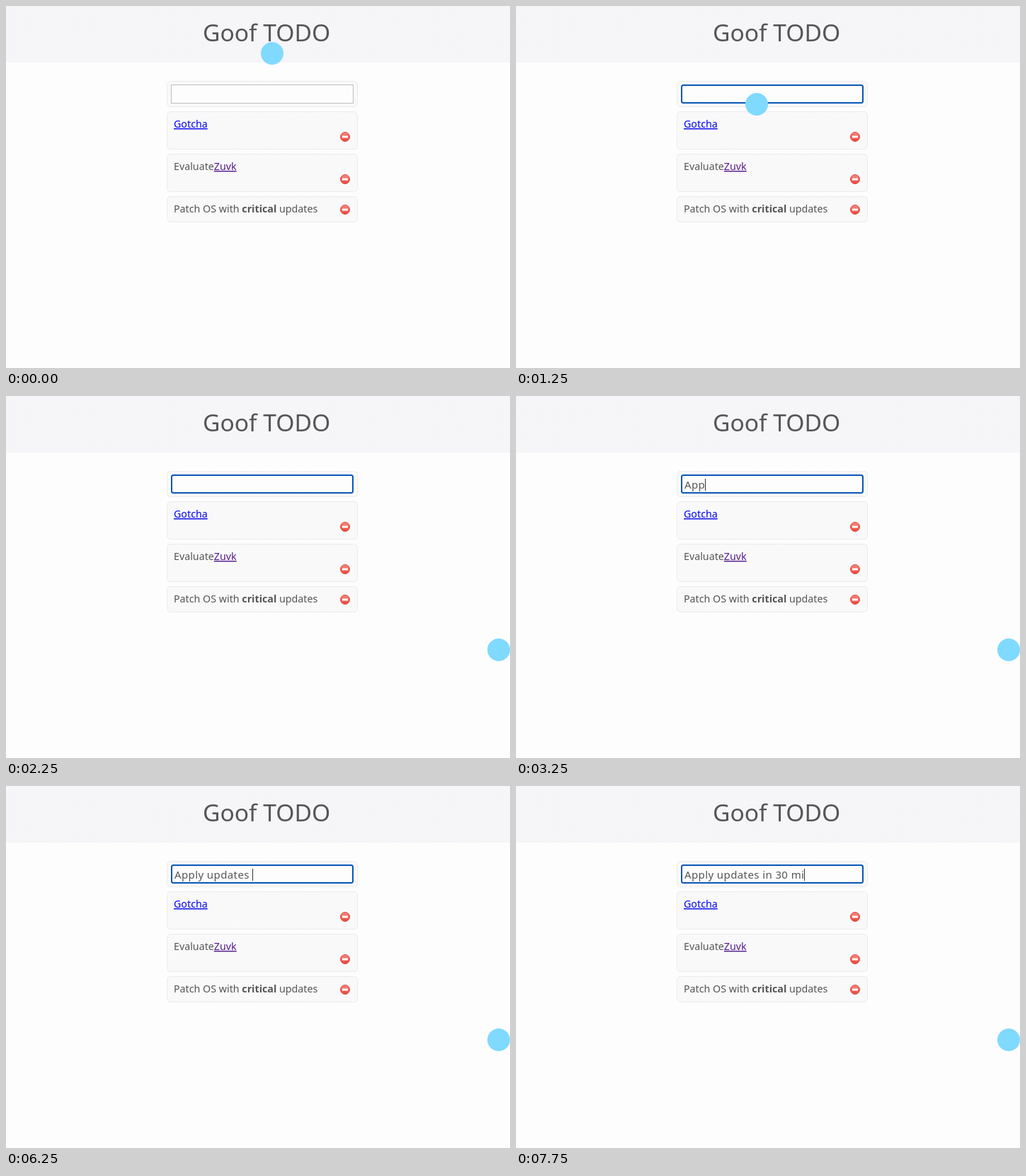
Animation of 712x512 px, one loop 8 s. Source, as an HTML page:

```html
<!DOCTYPE html>
<html lang="en">
<head>
<meta charset="utf-8">
<title>Goof TODO</title>
<style>
  html, body { margin: 0; width: 100%; height: 100%; overflow: hidden; background: #fdfdfd; }
  svg { display: block; width: 712px; height: 512px; }
  text { font-family: "Noto Sans", "Open Sans", sans-serif; font-size: 14.25px; fill: #555; white-space: pre; }
  .title { font-size: 33.6px; }
  .entry { font-size: 15px; letter-spacing: .4px; }
  .bold { font-weight: bold; }
  .link { fill: #0000ee; text-decoration: underline; }
  .visited { fill: #551a8b; text-decoration: underline; }
  .card { fill: url(#cardTexture); stroke: #ebebed; }
</style>
</head>
<body>
<svg viewBox="0 0 712 512">
  <defs>
    <pattern id="headerTexture" width="4" height="4" patternUnits="userSpaceOnUse">
      <rect width="4" height="4" fill="#f7f6f9"/>
      <path d="M0 0L4 4M-1 3L1 5M3 -1L5 1" stroke="#f2f1f5" stroke-width="1"/>
    </pattern>
    <pattern id="cardTexture" width="4" height="4" patternUnits="userSpaceOnUse">
      <rect width="4" height="4" fill="#fafafb"/>
      <path d="M0 0L4 4M-1 3L1 5M3 -1L5 1" stroke="#f6f6f8" stroke-width="1"/>
    </pattern>
    <linearGradient id="red" x2="0" y2="1">
      <stop offset="0" stop-color="#f98a80"/>
      <stop offset="1" stop-color="#ee4438"/>
    </linearGradient>
    <g id="remove">
      <circle r="6.5" fill="url(#red)" stroke="#d9483f"/>
      <rect x="-4" y="-1.5" width="8" height="3" rx=".5" fill="#fff"/>
    </g>
  </defs>

  <rect width="712" height="512" fill="#fdfdfd"/>
  <rect width="712" height="80" fill="url(#headerTexture)"/>
  <text class="title" x="278" y="50">Goof TODO</text>

  <g id="cards"></g>
  <text x="237" y="172"><tspan class="link">Gotcha</tspan></text>
  <text x="237" y="232">Evaluate<tspan class="visited">Zuvk</tspan></text>
  <text x="237" y="292">Patch OS with <tspan class="bold">critical</tspan> updates</text>

  <rect id="field" fill="#fdfdfd"/>
  <text id="entry" class="entry" x="238" y="131"></text>
  <rect id="caret" y="117" width="1" height="17" fill="#333"/>
  <circle id="pointer"/>
</svg>
<script>
const LOOP = 8000, STEP = 250, CLICK = 750;
const MESSAGE = "Apply updates in 30 mi";

// [time, visible characters]
const TYPING = [
  [CLICK, 0], [2750, 1], [3000, 2], [3250, 3], [3500, 5], [3750, 6],
  [5250, 7], [5500, 9], [5750, 11], [6000, 13], [6250, 14],
  [6500, 16], [6750, 17], [7250, 18], [7500, 20], [7750, 22]
];
// [time, x, y]
const PATH = [
  [0, 376, 67], [250, 332, 104], [500, 327, 134], [1000, 327, 134],
  [1250, 340, 139], [1500, 653, 257], [1750, 696, 359]
];

const $ = id => document.getElementById(id);
const set = (el, attrs) => {
  for (const name in attrs) el.setAttribute(name, attrs[name]);
};
const add = (parent, tag, attrs) => {
  const el = document.createElementNS("http://www.w3.org/2000/svg", tag);
  set(el, attrs);
  parent.appendChild(el);
};

for (const [y, height, iconY] of [[106, 37], [149, 54, 185], [209, 54, 245], [269, 37, 288]]) {
  add($("cards"), "rect", { class: "card", x: 227.5, y: y + .5, width: 269, height: height - 1, rx: 5 });
  if (iconY) add($("cards"), "use", { href: "#remove", x: 479, y: iconY });
}

function pointerAt(t) {
  const next = PATH.findIndex(p => p[0] > t);
  if (next < 0) return PATH[PATH.length - 1].slice(1);
  const [t0, x0, y0] = PATH[next - 1], [t1, x1, y1] = PATH[next];
  const k = (t - t0) / (t1 - t0);
  return [x0 + (x1 - x0) * k, y0 + (y1 - y0) * k];
}

function render(t) {
  const focused = t >= CLICK;
  set($("field"), focused
    ? { x: 234, y: 112, width: 256, height: 25, rx: 2.5, stroke: "#0a56b8", "stroke-width": 2 }
    : { x: 233.5, y: 111.5, width: 257, height: 26, rx: 0, stroke: "#bdbdbd", "stroke-width": 1 });

  const [lastKey, length] = TYPING.filter(k => k[0] <= t).pop() || [0, 0];
  $("entry").textContent = MESSAGE.slice(0, length);
  const caretOn = focused && Math.floor((t - lastKey) / 500) % 2 === 0;
  const width = length ? $("entry").getComputedTextLength() : 0;
  set($("caret"), { x: Math.round(238 + width), opacity: caretOn ? 1 : 0 });

  const [cx, cy] = pointerAt(t);
  const ring = t >= CLICK && t < CLICK + STEP;
  set($("pointer"), ring
    ? { cx, cy, r: 19.5, fill: "none", stroke: "#80d9ff", "stroke-width": 3, opacity: .55 }
    : { cx, cy, r: 16, fill: "#80d9ff", stroke: "none", opacity: 1 });
}

const start = performance.now();
function tick() {
  const t = (performance.now() - start) % LOOP;
  render(Math.floor(t / STEP) * STEP);
  requestAnimationFrame(tick);
}
tick();
</script>
</body>
</html>
```
